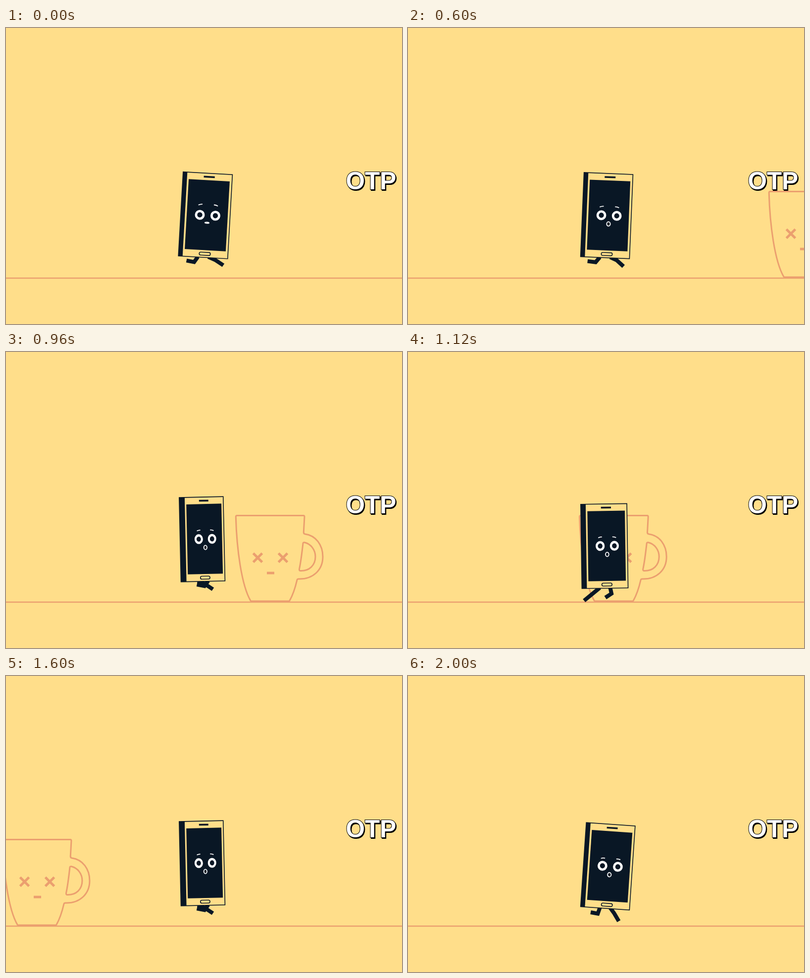
An HTML page for the animation above (2.04 s loop, 800 by 600 pixels).

```html
<!DOCTYPE html>
<html lang="en">
<head>
<meta charset="utf-8">
<title>Running phone</title>
<style>
  html, body { margin: 0; width: 100%; height: 100%; overflow: hidden; background: #ffde8a; }
  svg { display: block; width: 800px; height: 600px; }
  .line { fill: none; stroke: #eb9f6f; stroke-width: 3; stroke-linejoin: round; }
  .ground { stroke-width: 2.4; }
  .thick { stroke-width: 5; }
  .leg { fill: none; stroke: #091725; stroke-width: 8; }
  .edge { fill: #ffde8a; stroke: #091725; stroke-width: 1.6; }
  .dark { fill: #091725; }
  .white { fill: #fff; }
  .thin { fill: none; stroke: #fff; stroke-width: 1.8; }
  text { font: bold 49.5px "Liberation Sans", Arial, sans-serif; stroke: #000; stroke-width: 2; paint-order: stroke; }
</style>
</head>
<body>
<svg viewBox="0 0 800 600">
  <rect width="800" height="600" fill="#ffde8a"/>
  <path class="line ground" d="M0 507H800"/>
  <g id="mug">
    <path class="line" d="M466.5 331.5H601Q603 331.5 603 334L601.3 365Q601 368.5 604 369C626 372 640 391 640 415
      C640 442 620 461 591 460Q588.5 460 588 462Q582 488 573 504Q572.5 505 571 505H496Q494.5 505 494 504
      C476 473 466 400 464.3 334Q464.3 331.5 466.5 331.5Z"/>
    <path class="line" d="M600 388Q600.2 385.5 603 386C616 389 625 401 625 415C625 432 613 444 595 443.5
      Q592 443.3 592.5 440C596 424 598 406 600 388Z"/>
    <path class="line thick" d="M499.5 408l18 18m0-18l-18 18M550.5 408l18 18m0-18l-18 18M527 448h15"/>
  </g>
  <path id="legs" class="leg"/>
  <g id="phone"></g>
  <text x="687.9" y="328.6" fill="#000">OTP</text>
  <text x="686.4" y="327.1" fill="#fff">OTP</text>
</svg>
<script>
const LOOP = 2040, STEP = 40, STRIDE = 640;
const SCROLL = 0.736; // px per ms
const CENTER = 398, HEIGHT = 170.8, FLOOR = 504;

const smooth = f => f * f * (3 - 2 * f);
const easeOut = power => f => 1 - (1 - f) ** power;

// Leg poses of one stride; angle is measured from straight down, forwards.
// Each ease leads from its pose to the next one.
const POSES = [
  { name: "reach", at: -10, angle: 61, length: 35, bend: 1.5, ease: f => f * f },
  { name: "plant", at: 120, angle: 2, length: 29, bend: 0, ease: easeOut(2) },
  { name: "push", at: 200, angle: -68, length: 75, bend: 0, ease: easeOut(3) },
  { name: "fold", at: 290, angle: -72, length: 26, bend: 7, ease: f => smooth(f) ** 2 }
];

const el = id => document.getElementById(id);
const wave = (time, peak, period) => Math.cos((time - peak) / period * 2 * Math.PI);
const bump = (time, peak, width) => Math.exp(-(((time - peak) / width) ** 2));

function leg(hipX, hipY, phase) {
  const first = POSES[0].at;
  const t = (phase - first) % STRIDE + first;
  const i = POSES.findLastIndex(pose => pose.at <= t);
  const a = POSES[i], b = POSES[(i + 1) % POSES.length];
  const end = b === POSES[0] ? b.at + STRIDE : b.at;
  const f = (t - a.at) / (end - a.at), e = a.ease(f);
  const mix = key => a[key] + (b[key] - a[key]) * e;

  const tuck = a.name === "fold" ? Math.sin(Math.PI * f) : 0;
  const angle = mix("angle") * Math.PI / 180;
  const dx = Math.sin(angle), dy = Math.cos(angle);
  const length = Math.min(mix("length") - 7 * tuck, (FLOOR - hipY) / dy);
  const bend = mix("bend") + 2.5 * tuck;
  const kneeX = hipX + dx * length * 0.43 + dy * bend;
  const kneeY = hipY + dy * length * 0.43 - dx * bend;
  return `M${hipX} ${hipY}L${kneeX} ${kneeY}L${hipX + dx * length} ${hipY + dy * length}`;
}

function phone(time, turn) {
  const width = 94.3 + 5.5 * turn, side = 9.8 - 1.3 * turn;
  const left = -width / 2, front = left + side;
  const k = (width - side) / 91.2;
  const at = u => front + u * k;
  const shift = 0.6 * (1 - turn);

  const surprise = Math.max(0, 1 - time / 200);
  const relax = bump(time, 270, 150) + bump(time, 2120, 150);
  const blink = Math.min(1, 1.4 * bump(time, 280, 60));
  const eyeH = 10 - 8.5 * blink;
  const browY = -103.5 - 3.5 * surprise + 4.2 * relax;
  const tilt = 13 + 2 * surprise - 12 * relax;

  const eye = (u, dir) => {
    const x = at(u + shift), w = (9.1 + eyeH * 0.09) * k, hole = Math.max(0, eyeH - 4.8);
    return `<rect class="white" x="${x - w}" y="${-85.7 - eyeH}" width="${2 * w}" height="${2 * eyeH}" rx="${eyeH * k}" ry="${eyeH}"/>
      <ellipse class="dark" cx="${x}" cy="-85.7" rx="${5.2 * k}" ry="${hole}"/>
      <path class="thin" transform="translate(${x} ${browY}) rotate(${dir * tilt})" d="M${-4.2 * k} .4Q0 -.8 ${4.2 * k} .4"/>`;
  };

  return `<rect class="edge" x="${left}" y="${-HEIGHT}" width="${width}" height="${HEIGHT}"/>
    <rect class="dark" x="${left}" y="${-HEIGHT}" width="${side}" height="${HEIGHT}"/>
    <rect class="dark" x="${at(3.5)}" y="-156.7" width="${83 * k}" height="142"/>
    <rect class="dark" x="${at(33.7)}" y="-165.2" width="${22.2 * k}" height="3.5"/>
    <rect class="edge" x="${at(33.2)}" y="-10.4" width="${22.6 * k}" height="6" rx="3"/>
    ${eye(30, -1)}${eye(61.5, 1)}
    <ellipse class="thin" cx="${at(45.3 + shift)}" cy="${-68.6 - 1.8 * surprise}"
      rx="${(3.7 + 0.5 * surprise) * k}" ry="${4.3 - 3.2 * surprise}"/>`;
}

function draw(time) {
  const phase = time % STRIDE;
  const drop = (1 - wave(phase, -5, STRIDE / 2)) / 2;
  const base = 464.9 + 14 * drop ** 1.4;
  const lean = 1 + 2.9 * wave(phase, 70, STRIDE);
  const turn = wave(phase, 20, STRIDE);

  el("mug").setAttribute("transform", `translate(${-SCROLL * (time - 960)} 0)`);
  el("legs").setAttribute("d",
    leg(CENTER + 10.5, base - 1, phase) + leg(CENTER - 10.5, base - 1, phase + STRIDE / 2));
  el("phone").setAttribute("transform", `translate(${CENTER} ${base}) rotate(${lean})`);
  el("phone").innerHTML = phone(time, turn);
}

const start = performance.now();
function tick() {
  const time = (performance.now() - start) % LOOP;
  draw(Math.floor(time / STEP) * STEP);
  requestAnimationFrame(tick);
}
tick();
</script>
</body>
</html>
```
